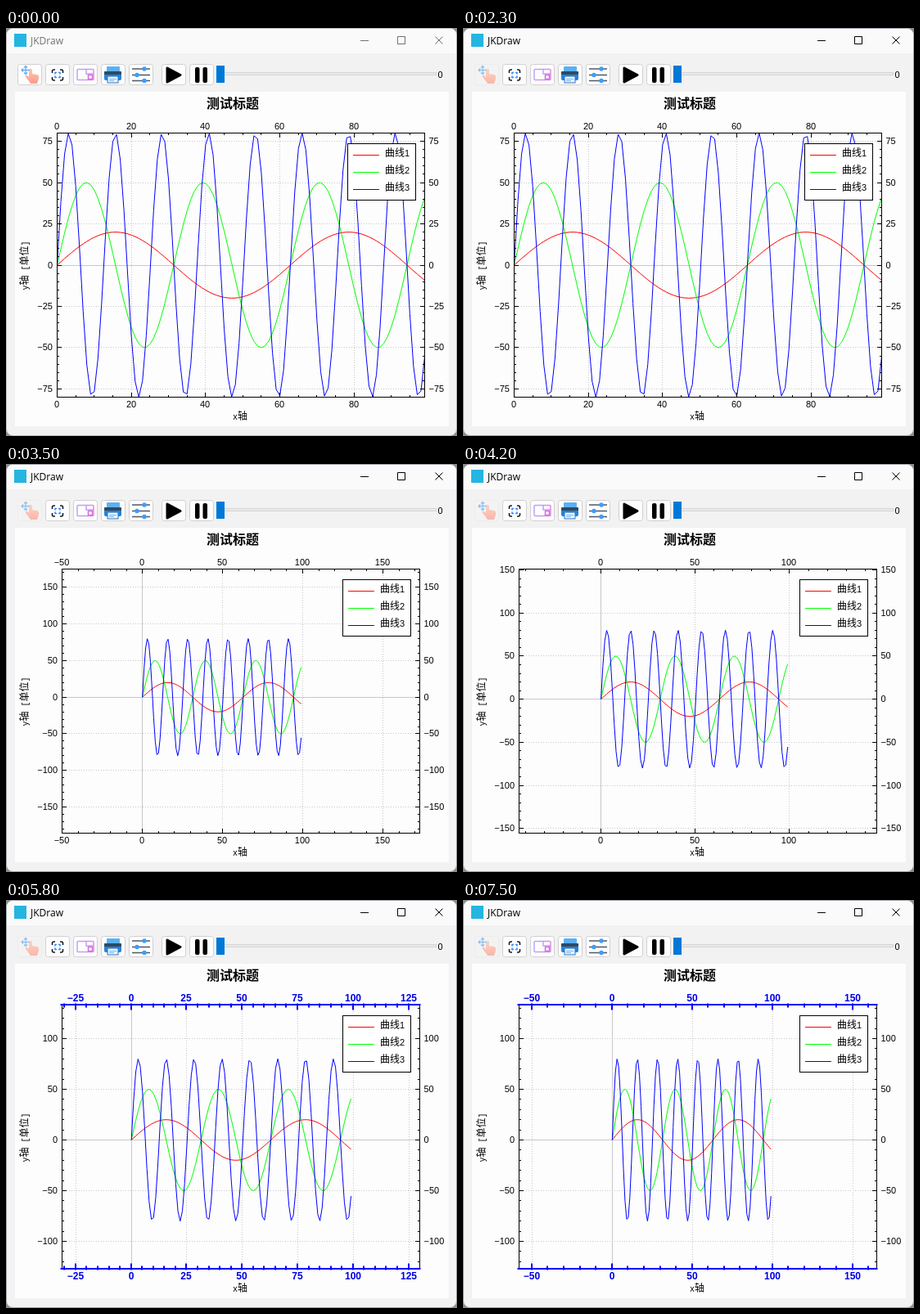
These frames come from a looping animation (551x499 px, 8 s). An HTML page:

```html
<!DOCTYPE html>
<html lang="zh-CN">
<head>
<meta charset="utf-8">
<style>
html, body { margin: 0; width: 100%; height: 100%; overflow: hidden; background: #8c8c8c; }
svg { display: block; }
text { font-family: "Liberation Sans", "Noto Sans CJK SC", "Noto Sans CJK", sans-serif; font-size: 11px; }
.cjk { font-size: 12px; }
.bold { font-weight: bold; font-size: 12px; fill: #0000e6; }
.half { font-family: "Liberation Mono", monospace; font-size: 10px; }
.digit { font-size: 11px; }
.button { fill: #fdfdfd; stroke: #d0d0d0; }
</style>
</head>
<body>
<svg width="551" height="499" viewBox="0 0 551 499">
  <defs>
    <clipPath id="clip"><rect id="clipBox" y="128" height="324"/></clipPath>
    <linearGradient id="violet"><stop stop-color="#b9a4ff"/><stop offset="1" stop-color="#e08bea"/></linearGradient>
    <linearGradient id="skin" x2="0" y2="1"><stop stop-color="#ffc9b0"/><stop offset="1" stop-color="#ff9b8c"/></linearGradient>
  </defs>

  <rect id="frame" x=".5" y=".5" width="550" height="498" rx="8" fill="#f2f2f2"/>
  <path d="M1 31V9Q1 1 9 1H542Q550 1 550 9V31Z" fill="#fafafa"/>
  <rect x="10" y="7" width="15" height="16" fill="#24b5e0"/>
  <g id="caption">
    <text x="30" y="20" style="font:12px 'Open Sans',sans-serif">JKDraw</text>
    <path d="M433 15.5H443M478.5 10.5H487.5V19.5H478.5ZM524.5 10.5L533.5 19.5M533.5 10.5L524.5 19.5" fill="none" stroke="#000"/>
  </g>

  <g id="buttons"></g>

  <g id="hand">
    <path d="M28 65L24 60Q23 57 26 58L28 60V51Q30 48 32 51V56L38 57Q41 58 40 62L38 68H30Z" fill="url(#skin)"/>
    <path d="M19 51.5H29M24 46.5V56.5M21 49.5L19 51.5L21 53.5M22 48.5L24 46.5L26 48.5M22 54.5L24 56.5L26 54.5" fill="none" stroke="#68aef2" stroke-width="1.3"/>
  </g>
  <g fill="none" stroke-width="1.6">
    <path d="M56.500 55V53Q56.500 51 58.500 51H60M66 51H67.500Q69.500 51 69.500 53V55M69.500 60V62Q69.500 64 67.500 64H66M60 64H58.500Q56.500 64 56.500 62V60" stroke="#1c1c24"/>
    <rect x="60" y="54.500" width="6" height="6" stroke="#3b8cf5" stroke-dasharray="4 2" stroke-dashoffset="2"/>
  </g>
  <g fill="none" stroke="url(#violet)" stroke-width="1.500">
    <rect x="87" y="50.500" width="20" height="13" rx="1"/>
    <path d="M98 51V56H107"/>
    <rect x="100.500" y="57.500" width="5" height="5" stroke="#d56be0"/>
  </g>
  <g>
    <rect x="123" y="47" width="16" height="8" rx="1" fill="#5ab1f5"/>
    <rect x="120" y="53" width="21" height="11" rx="2" fill="#2484dc"/>
    <rect x="120" y="53" width="21" height="4" rx="1" fill="#31495f"/>
    <rect x="124" y="59" width="13" height="8" fill="#e8f4ff" stroke="#2678c8"/>
    <path d="M126 62.500H135M126 64.500H132" stroke="#76b6ec"/>
  </g>
  <g stroke="#505a68" stroke-width="1.500" fill="#3f9cff">
    <path d="M154 50H176M154 57.500H176M154 64.500H176"/>
    <g stroke="#3f9cff"><circle cx="169" cy="50" r="2"/><circle cx="160" cy="57.500" r="2"/><circle cx="169" cy="64.500" r="2"/></g>
  </g>
  <path d="M197 49V66L213 57.500Z" stroke="#000" stroke-width="3" stroke-linejoin="round"/>
  <rect x="231" y="48" width="5.500" height="19" rx="2"/>
  <rect x="240.500" y="48" width="5.500" height="19" rx="2"/>

  <rect x="257.500" y="54.500" width="268" height="3" fill="#e7eaea" stroke="#d6d6d6"/>
  <rect x="257" y="46" width="10" height="21" fill="#0078d7"/>
  <text x="527.500" y="61">0</text>

  <rect x="11" y="78" width="530" height="409" fill="#fdfdfd"/>
  <text x="277" y="98" text-anchor="middle" style="font-size:16px;font-weight:bold">测试标题</text>
  <text x="286" y="479" text-anchor="middle" class="cjk"><tspan class="half">x</tspan>轴</text>
  <text transform="translate(27 290.500) rotate(-90)" text-anchor="middle" class="cjk"><tspan class="half">y</tspan>轴<tspan class="half">&#160;[</tspan>单位<tspan class="half">]</tspan></text>
  <g id="plot"></g>
  <g id="legend"></g>
</svg>

<script>
const LOOP = 8000, TOP = 128, BOTTOM = 451, ZOOM = 0.85;
const $ = id => document.getElementById(id);

const curves = [
  { amp: 20, period: 10, color: '#f00' },
  { amp: 50, period: 5, color: '#0f0' },
  { amp: 80, period: 2, color: '#00f' }
];

// Wheel notches: n > 0 zooms out; ax, ay is the fixed point as a fraction of the plot.
const wheel = (t, n, ax, ay) => ({ t, n, ax, ay });
const outs = (t, n) => wheel(t, n, 0.3464, 0.4655);
const ins = t => wheel(t, -1, 0.3425, 0.462);
const drag = t => ({ t, dx: -2.38, dy: 0.524 });
const xOnly = (t, n) => wheel(t, n, 0.434);
const events = [
  outs(2700, 1), outs(2800, 2), outs(3100, 1), outs(3200, 1),
  ...[3300, 3400, 3500, 3600, 3700].map(drag),
  ...[4200, 4300, 4500, 4600, 4800].map(ins),
  wheel(4900, 3, 0.303, 0.495),
  xOnly(6300, 2), xOnly(6400, 3), xOnly(6800, 5), xOnly(6900, 1),
  xOnly(7200, -4), xOnly(7300, -2), xOnly(7500, -3)
];

function viewAt(t) {
  const v = { x: 0, w: 99, y: 80, h: 160, selected: t >= 5800 };
  for (const e of events) {
    if (e.t > t) break;
    if (e.dx) { v.x += e.dx; v.y += e.dy; continue; }
    const k = ZOOM ** -e.n;
    v.x -= e.ax * v.w * (k - 1);
    v.w *= k;
    if (e.ay !== undefined) {
      v.y += e.ay * v.h * (k - 1);
      v.h *= k;
    }
  }
  return v;
}

function ticks(low, size) {
  const raw = size / 5, mag = 10 ** Math.floor(Math.log10(raw));
  const m = [1, 2, 2.5, 5, 10].reduce((a, b) => Math.abs(b - raw / mag) < Math.abs(a - raw / mag) ? b : a);
  const parts = m === 2 ? 4 : 5, sub = m * mag / parts;
  const list = [];
  for (let i = Math.ceil(low / sub - 1e-6); i * sub <= low + size + 1e-6; i++)
    list.push({ value: Math.round(i * sub), major: i % parts === 0 });
  return list;
}

const label = v => String(v).replace('-', '−');
const path = (d, stroke, extra = '') => `<path d="${d}" fill="none" stroke="${stroke}" ${extra}/>`;
const text = (x, y, s, anchor, cls = '') => `<text x="${x}" y="${y}" text-anchor="${anchor}" class="${cls}">${s}</text>`;

function drawPlot(v) {
  const ys = ticks(v.y - v.h, v.h), xs = ticks(v.x, v.w);
  const chars = Math.max(...ys.filter(k => k.major).map(k => label(k.value).length));
  const left = 44 + 6 * chars, right = 529 - 6 * chars;
  const px = x => left + 0.5 + (x - v.x) / v.w * (right - left);
  const py = y => TOP + 0.5 + (v.y - y) / v.h * (BOTTOM - TOP);
  const snap = n => Math.floor(n) + 0.5;
  let grid = '', zero = '', xMarks = '', yMarks = '', labels = '';

  for (const { value, major } of xs) {
    const x = snap(px(value)), len = major ? 5 : 2;
    xMarks += `M${x} ${TOP}v${len + 1}M${x} ${BOTTOM + 1}v${-len - 1}`;
    if (!major) continue;
    const line = `M${x} ${BOTTOM + 1}V${TOP}`;
    value ? grid += line : zero += line;
    for (const y of [124, 464]) labels += text(x - 0.5, y, label(value), 'middle', v.selected ? 'bold' : '');
  }
  for (const { value, major } of ys) {
    const y = snap(py(value)), len = major ? 5 : 2;
    yMarks += `M${left} ${y}h${len + 1}M${right + 1} ${y}h${-len - 1}`;
    if (!major) continue;
    const line = `M${left} ${y}H${right + 1}`;
    value ? grid += line : zero += line;
    labels += text(left - 5, y + 3.5, label(value), 'end') + text(right + 5.5, y + 3.5, label(value), 'start');
  }

  const lines = curves.map(c => {
    const points = Array.from({ length: 100 }, (_, x) =>
      px(x).toFixed(2) + ' ' + py(c.amp * Math.sin(x / c.period)).toFixed(2));
    return path('M' + points.join('L'), c.color, 'stroke-linejoin="bevel"');
  }).join('');

  $('clipBox').setAttribute('x', left);
  $('clipBox').setAttribute('width', right - left + 1);
  const xAxes = [TOP, BOTTOM].map(y => `M${left} ${y + 0.5}H${right + 1}`).join('');
  const yAxes = [left, right].map(x => `M${x + 0.5} ${TOP}V${BOTTOM + 1}`).join('');
  // A two-pixel pen sits on whole coordinates to stay sharp.
  const thick = 'stroke-width="2" stroke-linecap="square" transform="translate(-.5 -.5)"';
  $('plot').innerHTML =
    path(grid, '#c8c8c8', 'stroke-dasharray="1 2"') + path(zero, '#c8c8c8') +
    `<g clip-path="url(#clip)">${lines}</g>` +
    path(yAxes + yMarks, '#000') +
    (v.selected ? path(xAxes + xMarks, '#00f', thick) : path(xAxes + xMarks, '#000')) + labels;
  $('legend').setAttribute('transform', `translate(${right - 94} 141)`);
}

$('legend').innerHTML = '<rect x=".5" y=".5" width="83" height="69" fill="#fff" stroke="#000"/>' +
  curves.map((c, i) => path(`M7 ${14.5 + 21 * i}H39`, c.color) +
    `<text x="46" y="${16 + 21 * i}" class="cjk">曲线<tspan class="digit">${i + 1}</tspan></text>`).join('');

$('buttons').innerHTML = [14, 48, 82, 116, 150, 190, 224].map(x =>
  `<rect class="button" x="${x + 0.5}" y="44.5" width="29" height="25" rx="3"/>`).join('');
const [panButton, fitButton] = $('buttons').children;

const mix = (a, b, k) => `rgb(${a.map((n, i) => Math.round(n + (b[i] - n) * k))})`;
const clamp = n => Math.max(0, Math.min(1, n));

function drawWindow(t) {
  const hover = clamp(1 - Math.abs(t - 1300) / 300);
  fitButton.style.fill = mix([253, 253, 253], [224, 238, 249], hover);
  fitButton.style.stroke = mix([208, 208, 208], [0, 120, 215], hover);

  const active = clamp((t - 2000) / 300);
  $('caption').setAttribute('opacity', 0.55 + 0.45 * active);
  $('frame').setAttribute('stroke', mix([190, 190, 194], [160, 164, 172], active));
  panButton.style.fill = mix([253, 253, 253], [243, 243, 243], active);
  panButton.style.stroke = mix([208, 208, 208], [236, 236, 236], active);
  $('hand').setAttribute('opacity', 1 - 0.3 * active);
}

let last = -1;
function frame() {
  const t = Math.floor(performance.now() % LOOP / 100) * 100;
  if (t !== last) {
    last = t;
    drawWindow(t);
    drawPlot(viewAt(t));
  }
  requestAnimationFrame(frame);
}
frame();
</script>
</body>
</html>
```
